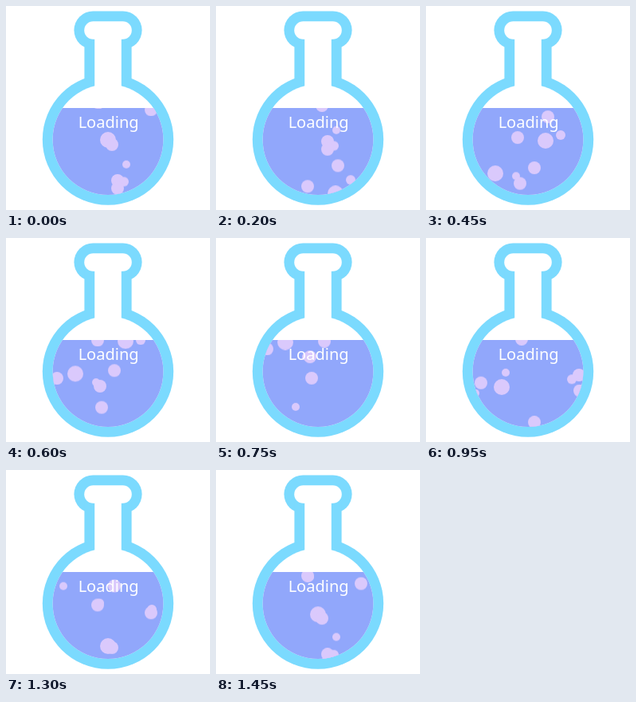
Animation, 256 px wide and 256 px high, one loop 1.5 s. Source, as an HTML page:

```html
<!DOCTYPE html>
<html lang="en">
<head>
<meta charset="utf-8">
<title>Loading flask</title>
<style>
  html, body { margin: 0; width: 100%; height: 100%; overflow: hidden; background: #fff; }
  svg { display: block; width: 100vw; height: 100vh; }
  .glass { fill: #7bdafe; }
  .hollow { fill: #fff; }
  .liquid { fill: #91a7fb; }
  .bubbles { fill: #dac9fc; }
  .bubbles circle { animation: rise 1500ms linear infinite; }
  text { font: 20px "Noto Sans", "Open Sans", sans-serif; fill: #fff; text-anchor: middle; }
  @keyframes rise {
    from { transform: translateY(var(--reach)); }
    to { transform: translateY(calc(-1 * var(--reach))); }
  }
</style>
</head>
<body>
<svg viewBox="0 0 256 256">
  <defs>
    <clipPath id="bowl"><circle cx="128" cy="167.6" r="69.4"/></clipPath>
  </defs>
  <g class="glass">
    <rect x="85.4" y="6.5" width="85.2" height="47.6" rx="23.8"/>
    <rect x="98.4" y="40" width="59.2" height="70"/>
    <circle cx="128" cy="167.6" r="82.2"/>
  </g>
  <g class="hollow">
    <rect x="98.2" y="19.3" width="59.6" height="22.4" rx="11.2"/>
    <rect x="111.2" y="30" width="33.6" height="80"/>
    <circle cx="128" cy="167.6" r="69.4"/>
  </g>
  <g clip-path="url(#bowl)">
    <svg x="50" y="128" width="156" height="112" viewBox="50 128 156 112">
      <rect class="liquid" x="50" y="128" width="156" height="112"/>
      <g class="bubbles" id="bubbles"></g>
    </svg>
  </g>
  <text x="128.6" y="153">Loading</text>
</svg>
<script>
  const LOOP = 1500;
  const GAP = 20;
  const MID_Y = 182;
  const SIZES = [5, 8, 6, 8, 10, 8];
  const group = document.getElementById('bubbles');

  // Bigger bubbles rise faster; each crosses MID_Y halfway through its cycle.
  function addBubble(x, r, passes) {
    const speed = 165 + 10 * r;
    const dot = document.createElementNS(group.namespaceURI, 'circle');
    dot.setAttribute('cx', x);
    dot.setAttribute('cy', MID_Y);
    dot.setAttribute('r', r);
    dot.style.setProperty('--reach', speed * LOOP / 2000 + 'px');
    dot.style.animationDelay = passes - LOOP * 1.5 + 'ms';
    group.append(dot);
  }

  // A burst releases one bubble per GAP, stepping through SIZES.
  function burst(start, size, ...xs) {
    xs.forEach((x, i) => addBubble(x, SIZES[(size + i) % SIZES.length], start + i * GAP));
  }

  burst(79, 0, 151);
  burst(152, 1, 140, 148, 140);
  burst(276, 1, 153);
  burst(362, 2, 169, 115, 150);
  burst(537, 3, 136, 87, 64, 113, 118);
  burst(726, 1, 120);
  burst(890, 0, 100, 192, 183, 69, 95, 193, 62);
  burst(1132, 0, 72, 136);
  burst(1230, 0, 118, 115, 183, 182);
  burst(1448, 4, 128, 133);
</script>
</body>
</html>
```
